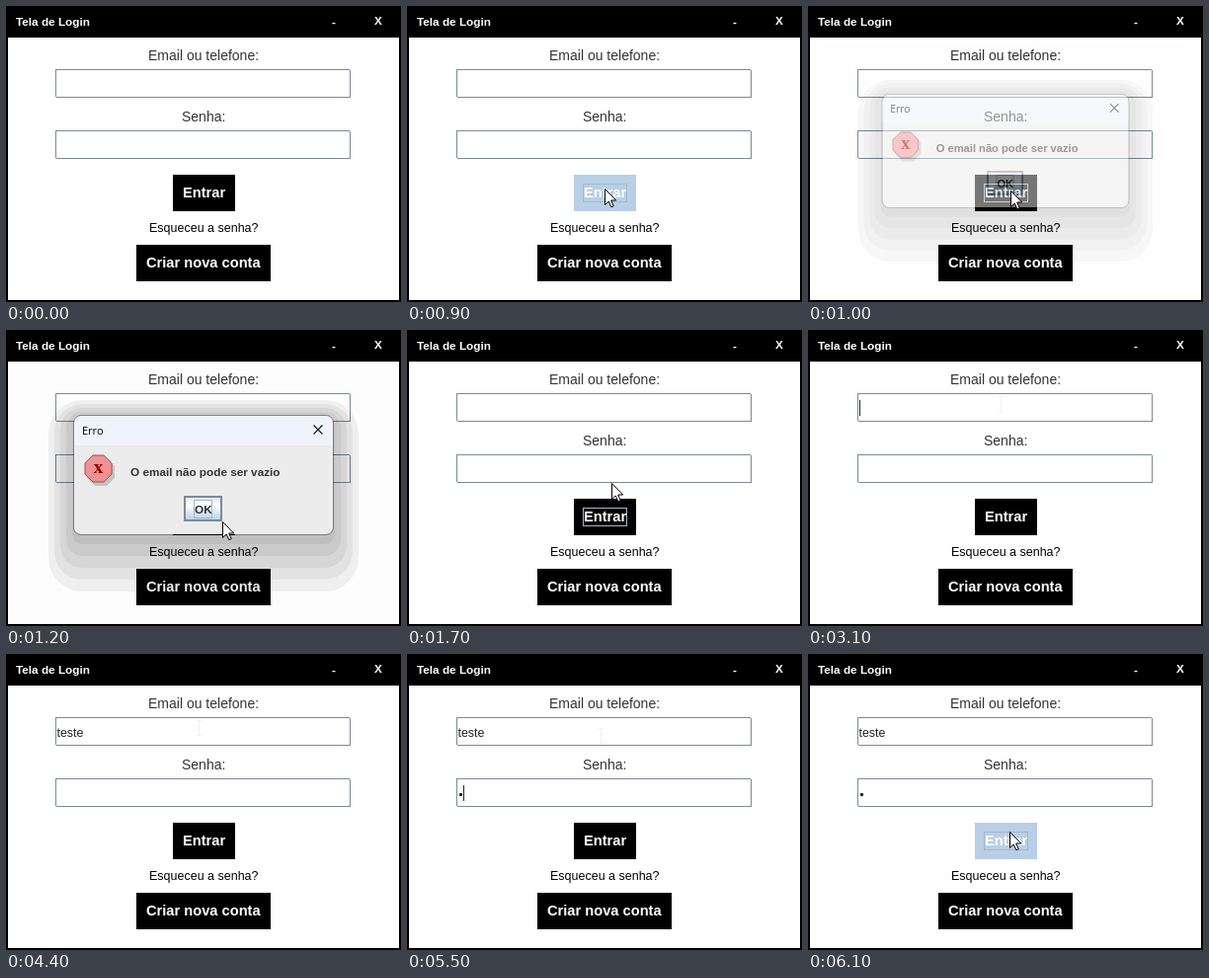
An HTML page that plays this animation: 400 by 300 pixels, repeating every 8 s.

```html
<!DOCTYPE html>
<html lang="pt">
<head>
<meta charset="utf-8">
<title>Tela de Login</title>
<style>
  html, body { margin: 0; width: 100%; height: 100%; overflow: hidden; background: #fff; }
  svg { display: block; width: 100%; height: 100%; font-family: "Liberation Sans", Arial, sans-serif; }
  text { white-space: pre; }
  .label { font-size: 14px; fill: #333; }
  .small { font-size: 12.4px; fill: #222; }
  .button { font-size: 14.67px; font-weight: bold; fill: #fff; }
  .bold { font-size: 11.75px; font-weight: bold; }
  .focus { fill: none; stroke: #a3b8cc; }
  #dialog { transform-origin: 200px 147px; }
</style>
</head>
<body>
<svg viewBox="0 0 400 300">
  <defs>
    <linearGradient id="metal" x2="0" y2="1">
      <stop offset="0" stop-color="#dde8f3"/>
      <stop offset=".35" stop-color="#fff"/>
      <stop offset="1" stop-color="#b8cfe5"/>
    </linearGradient>
    <path id="field" d="M50 .5H348M348.5 1V29M51 28.5H349M50.5 0V28" stroke="#7a8a99"/>
  </defs>

  <rect width="400" height="300"/>
  <rect x="2" y="32" width="396" height="266" fill="#fff"/>
  <g class="bold" fill="#fff">
    <text x="10" y="20">Tela de Login</text>
    <text x="330" y="20">-</text>
    <text x="373" y="19">X</text>
  </g>

  <text class="label" x="144" y="55">Email ou telefone:</text>
  <use href="#field" y="64"/>
  <text class="label" x="178" y="117">Senha:</text>
  <use href="#field" y="126"/>
  <text id="email" class="small" x="51.5" y="84"></text>
  <circle id="dot" cx="54.5" cy="142.5" r="1.7" fill="#222"/>
  <rect id="caret" width="1" height="16" fill="#222"/>

  <rect id="enter" x="169" y="171" width="63" height="37"/>
  <text class="button" x="179" y="194">Entrar</text>
  <rect id="enterFocus" class="focus" x="178.5" y="180.5" width="44" height="18"/>
  <text x="145" y="229" font-size="12.5">Esqueceu a senha?</text>
  <rect x="132" y="242" width="136" height="37"/>
  <text class="button" x="142" y="265">Criar nova conta</text>

  <g id="dialog">
    <g id="shadow" opacity=".99"></g>
    <rect x="69" y="87" width="262" height="120" rx="7" fill="#ececec"/>
    <path d="M69 117V94q0-7 7-7H324q7 0 7 7v23Z" fill="#eff3fb"/>
    <rect x="68.5" y="86.5" width="263" height="121" rx="7.5" fill="none" stroke="#000" stroke-opacity=".35"/>
    <text x="77" y="105.5" font-size="11" style="font-family:'Open Sans',sans-serif">Erro</text>
    <path d="M311.5 96.5l9 9m0-9l-9 9" stroke="#111" stroke-width="1.1"/>
    <path d="M90 130h12l8 8v12l-8 8H90l-8-8v-12Z" fill="#999" opacity=".5"/>
    <path d="M88 127h11l8 8v11l-8 8H88l-8-8v-11Z" fill="#ee9393" stroke="#a84b4b"/>
    <text x="93.5" y="145" text-anchor="middle" font-size="19" font-weight="bold" fill="#8b0000"
      style="font-family:'Liberation Serif',serif">x</text>
    <text class="bold" x="126" y="148" fill="#333">O email não pode ser vazio</text>
    <rect id="ok" x="181" y="169" width="37" height="24" stroke="#7a8a99" stroke-width="2"/>
    <rect class="focus" x="190.5" y="172.5" width="18" height="18"/>
    <text class="bold" x="191" y="186" fill="#333">OK</text>
  </g>

  <path id="beam" d="M-3 -7.5H3M0 -7V7M-3 7.5H3" fill="none" stroke="#f1f1f1"/>
  <path id="arrow" d="M.5 .5V16.5L4.2 13 6.8 18.7 9.2 17.7 6.7 12H11.7Z" fill="#fff" stroke="#000"/>
</svg>
<script>
const LOOP = 8000, STEP = 100;
const $ = id => document.getElementById(id);
const clamp = (v, lo = 0, hi = 1) => Math.min(hi, Math.max(lo, v));
const smooth = u => u * u * (3 - 2 * u);
const progress = (t, from, to) => clamp((t - from) / (to - from));
const within = (t, from, to) => t >= from && t < to;
const show = (id, on) => $(id).setAttribute("visibility", on ? "visible" : "hidden");
const place = (id, x, y) => $(id).setAttribute("transform", `translate(${x} ${y})`);

const moves = [
  { from: 0, to: 600, x: 176, y: 208 },
  { from: 600, to: 900, x: 200, y: 185 },
  { from: 900, to: 1200, x: 219, y: 194 },
  { from: 1200, to: 1400, x: 208, y: 184 },
  { from: 1500, to: 1800, x: 207, y: 145 },
  { from: 2100, to: 2200, x: 195, y: 75 },
  { from: 5400, to: 6000, x: 204, y: 180 }
];

// Nested translucent layers, widest below the dialog
function buildShadow() {
  let layers = '<rect x="2" y="32" width="396" height="266" opacity=".012"/>';
  for (let i = 0; i < 5; i++) {
    const side = 26 - 6 * i, top = 16 - 4 * i, bottom = 58 - 12 * i;
    layers += `<rect x="${69 - side}" y="${87 - top}" width="${262 + 2 * side}"
      height="${120 + top + bottom}" rx="${8 + side}" opacity=".055"/>`;
  }
  $("shadow").innerHTML = layers;
}

function drawPointer(t) {
  let x = 31, y = -24;
  for (const move of moves) {
    const u = smooth(progress(t, move.from, move.to));
    x += (move.x - x) * u;
    y += (move.y - y) * u;
  }
  x = Math.round(x);
  y = Math.round(y);
  const overField = within(x, 50, 349) && (within(y, 64, 93) || within(y, 126, 155));
  show("beam", overField);
  show("arrow", !overField);
  place("beam", x + .5, y);
  place("arrow", x, y);
}

function drawFields(t) {
  const letters = Math.max(t >= 3400 ? 1 : 0, clamp((t - 3400) / STEP, 0, 5));
  const email = $("email");
  email.textContent = "teste".slice(0, letters);
  const dotted = t >= 5400;
  show("dot", dotted);
  show("caret", within(t, 2200, 2700) || within(t, 3100, 4400) || within(t, 4900, 6100));
  if (t >= 5300) place("caret", dotted ? 57 : 52, 133);
  else place("caret", 52 + Math.round(email.getComputedTextLength()), 71);
}

function drawButtons(t) {
  const pressed = within(t, 900, 1000) || t >= 6100;
  $("enter").setAttribute("fill", pressed ? "#b8cfe5" : "#000");
  show("enterFocus", within(t, 900, 2200) || t >= 6100);
  $("ok").setAttribute("fill", within(t, 1400, 1600) ? "#b8cfe5" : "url(#metal)");
}

function drawDialog(t) {
  const shown = progress(t, 900, 1100) - progress(t, 1400, 1600);
  $("dialog").style.opacity = shown;
  $("dialog").style.transform = `scale(${.9 + .1 * shown})`;
}

buildShadow();
const start = performance.now();
function draw() {
  const elapsed = (performance.now() - start) % LOOP;
  const t = Math.floor(elapsed / STEP) * STEP;
  drawPointer(t);
  drawFields(t);
  drawButtons(t);
  drawDialog(t);
  requestAnimationFrame(draw);
}
draw();
</script>
</body>
</html>
```
